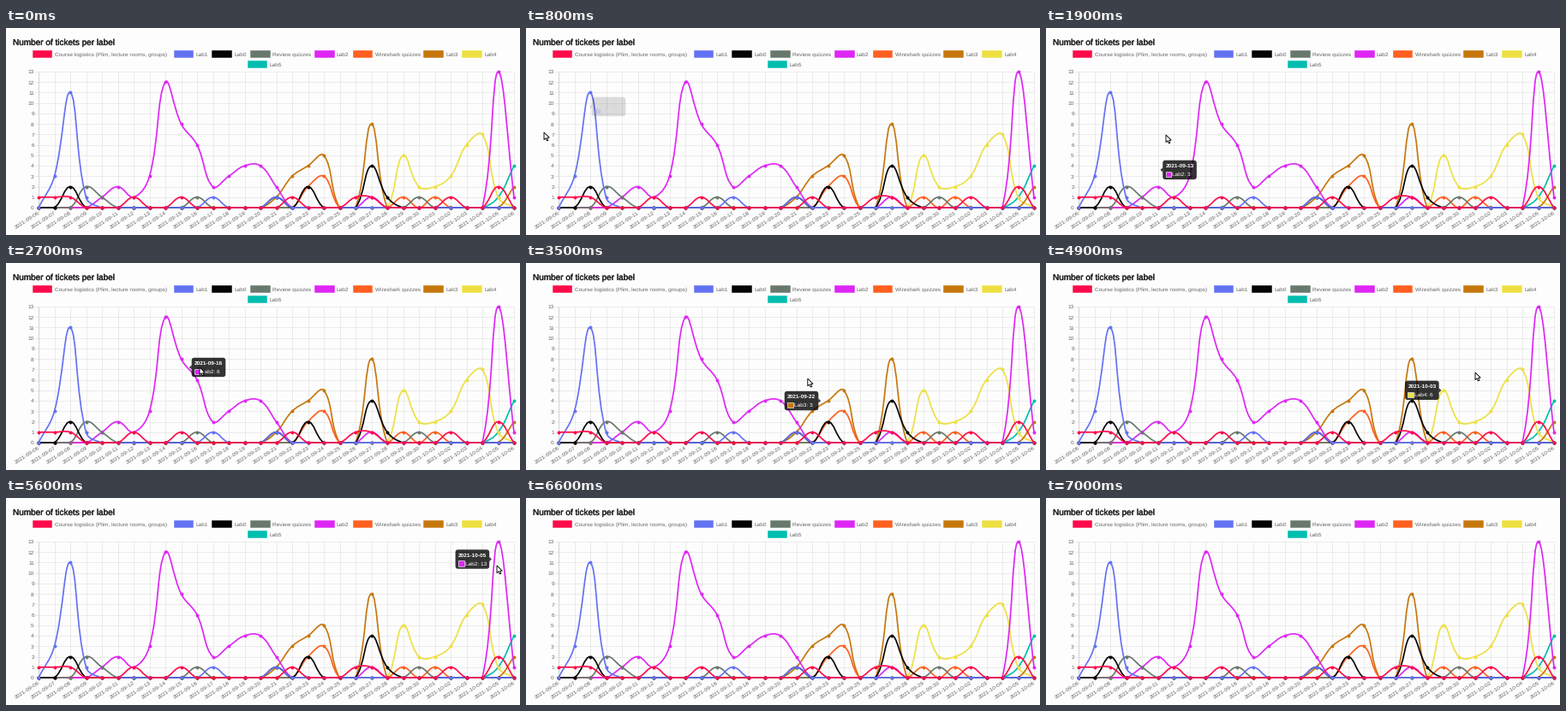
These frames come from a looping animation (600 by 242 pixels, 7200 ms). A matplotlib script:

```python
import math

import matplotlib.pyplot as plt
import numpy as np
from matplotlib.animation import FuncAnimation
from matplotlib.patches import FancyBboxPatch, PathPatch, Polygon, Rectangle
from matplotlib.path import Path
from matplotlib.patheffects import withStroke

W, H, DPI = 600, 242, 100
STEP, LOOP = 100, 7200
LEFT, RIGHT, TOP, BOTTOM = 38, 593, 51, 210
DAYS, TOP_VALUE = 31, 13
SCALE = 0.54              # page pixels to stage pixels
FONT = 12 * SCALE
TIP_W, TIP_H, TIP_GAP = 39.6, 22.4, 4.8
TIP_EASE, TIP_LEAVE = 400, 5850

plt.rcParams["font.family"] = "Liberation Sans"
plt.rcParams["text.hinting"] = "none"

# name: (colour, legend x, legend y, values by day)
SERIES = {
    "Course logistics (Plim, lecture rooms, groups)": (
        "#fd0b4a", 31.8, 30.5,
        {0: 1, 1: 1, 2: 1, 6: 1, 9: 1, 16: 1, 20: 1, 21: 1, 26: 1, 29: 2}),
    "Lab1": ("#6372f3", 196.7, 30.5, {1: 3, 2: 11, 3: 1, 11: 1, 15: 1}),
    "Lab0": ("#050505", 241.3, 30.5, {2: 2, 15: 1, 17: 2, 21: 4, 22: 1}),
    "Review quizzes": ("#68786c", 285.9, 30.5, {3: 2, 4: 1, 10: 1, 24: 1}),
    "Lab2": (
        "#de26f5", 361.0, 30.5,
        {4: 1, 5: 2, 6: 1, 7: 3, 8: 12, 9: 8, 10: 6, 11: 2, 12: 3, 13: 4,
         14: 4, 15: 2, 21: 1, 29: 13, 30: 1}),
    "Wireshark quizzes": (
        "#ff5f1f", 405.8, 30.5, {17: 2, 18: 3, 23: 1, 25: 1}),
    "Lab3": (
        "#c6770c", 488.4, 30.5,
        {15: 1, 16: 3, 17: 4, 18: 5, 21: 8, 30: 2}),
    "Lab4": (
        "#eee043", 533.4, 30.5,
        {23: 5, 24: 2, 25: 2, 26: 3, 27: 6, 28: 7, 29: 1}),
    "Lab5": ("#00beaf", 282.8, 42.4, {29: 1, 30: 4}),
}

# time, day, series under the pointer
HOVERS = [
    (782, 1, "Lab1"), (1240, 2, "Lab1"), (1740, 5, "Lab2"),
    (1872, 7, "Lab2"), (2050, 9, "Lab2"), (2652, 10, "Lab2"),
    (2950, 13, "Lab2"), (3200, 14, "Lab2"), (3500, 16, "Lab3"),
    (3650, 17, "Lab3"), (3780, 18, "Lab3"), (4000, 21, "Lab3"),
    (4370, 23, "Lab4"), (4900, 27, "Lab4"), (5300, 28, "Lab4"),
    (5490, 29, "Lab2"),
]

# time, x, y of the pointer tip
POINTER = np.array([
    (700, 8, 124), (800, 21, 122), (1240, 57, 121), (1700, 117, 124),
    (1900, 140, 125), (2300, 180, 120), (2700, 226, 122), (3200, 288, 134),
    (3700, 356, 136), (4200, 428, 131), (4900, 501, 128), (5300, 547, 116),
    (5600, 573, 79), (5900, 584, 14),
])
ARROW = np.array([(0, 0), (0, 8.6), (2, 6.8), (3.4, 9.9), (4.9, 9.2),
                  (3.6, 6.3), (6.2, 6.1)])


def pt(px):
    return px * 72 / DPI


def day_x(day):
    return LEFT + (RIGHT - LEFT) * day / (DAYS - 1)


def value_y(value):
    return BOTTOM - (BOTTOM - TOP) * value / TOP_VALUE


def day_name(day):
    date = 6 + day
    return f"2021-09-{date:02d}" if date <= 30 else f"2021-10-{date - 30:02d}"


def ease_out(u):
    return 1 - (1 - min(max(u, 0), 1)) ** 4


def text(x, y, s, size=FONT, color="#666666", **kw):
    """Text whose capitals are centred on y."""
    return ax.text(x, y + 0.36 * size, s, fontsize=pt(size), color=color,
                   va="baseline", **kw)


def spline(points, tension=0.4):
    """Smooth path through the points, handles kept inside the chart."""
    low, high = (LEFT, TOP), (RIGHT, BOTTOM)
    handles = []
    for k, cur in enumerate(points):
        prev = points[max(k - 1, 0)]
        nxt = points[min(k + 1, len(points) - 1)]
        before, after = math.dist(prev, cur), math.dist(cur, nxt)
        span = (nxt - prev) * tension / (before + after)
        handles.append((np.clip(cur - span * before, low, high),
                        np.clip(cur + span * after, low, high)))
    verts = [points[0]]
    for k in range(1, len(points)):
        verts += [handles[k - 1][1], handles[k][0], points[k]]
    return Path(verts, [Path.MOVETO] + [Path.CURVE4] * (len(verts) - 1))


def draw_grid():
    tick = 10 * SCALE
    xs = [day_x(d) for d in range(DAYS)]
    ys = [value_y(v) for v in range(TOP_VALUE + 1)]
    grid = dict(colors="#e6e6e6", linewidths=pt(0.75), zorder=1)
    ax.vlines(xs, TOP, BOTTOM + tick, **grid)
    ax.hlines(ys, LEFT - tick, RIGHT, **grid)
    ax.vlines([LEFT], TOP, BOTTOM + tick, colors="#cccccc",
              linewidths=pt(0.75), zorder=1)
    for value, y in enumerate(ys):
        text(32.8, y, str(value), ha="right")
    for day, x in enumerate(xs):
        ax.text(x + 0.5, BOTTOM + tick, day_name(day), fontsize=pt(FONT),
                color="#666666", rotation=33, rotation_mode="anchor",
                ha="right", va="center_baseline")


def draw_legend():
    for name, (color, x, y, _) in SERIES.items():
        ax.add_patch(Rectangle((x, y - 3.25), 40 * SCALE, 6.5, fc=color,
                               ec=color, lw=pt(1.5), joinstyle="miter"))
        text(x + 46 * SCALE, y, name)


def draw_series():
    for k, (color, _, _, values) in enumerate(SERIES.values()):
        points = np.array([(day_x(d), value_y(values.get(d, 0)))
                           for d in range(DAYS)])
        z = 20 - k
        ax.add_patch(PathPatch(spline(points), fill=False, ec=color,
                               lw=pt(1.7), capstyle="butt", zorder=z))
        ax.plot(*points.T, "o", color=color, ms=pt(3.9), mew=0, zorder=z)


def tip_corner(day, name):
    x, y = day_x(day), value_y(SERIES[name][3][day])
    on_left = x > (LEFT + RIGHT) / 2
    left = x - TIP_GAP - TIP_W if on_left else x + TIP_GAP
    return np.array([left, y - TIP_H / 2]), on_left


def tip_state(t):
    """Corner, side, opacity and hovered item of the tooltip at time t."""
    pos, on_left = tip_corner(2, "Lab1")
    item = None
    ends = [h[0] for h in HOVERS[1:]] + [LOOP]
    for (start, day, name), end in zip(HOVERS, ends):
        if t < start:
            break
        goal, on_left = tip_corner(day, name)
        pos = pos + (goal - pos) * ease_out((min(t, end) - start) / TIP_EASE)
        item = day, name
    alpha = ease_out((t - HOVERS[0][0]) / TIP_EASE)
    if t > TIP_LEAVE:
        alpha *= 1 - ease_out((t - TIP_LEAVE) / 150)
    return pos, on_left, alpha, item


fig = plt.figure(figsize=(W / DPI, H / DPI), dpi=DPI, facecolor="#fdfdfd")
ax = fig.add_axes([0, 0, 1, 1])
ax.set_xlim(0, W)
ax.set_ylim(H, 0)
ax.axis("off")

text(8, 16.4, "Number of tickets per label", 10, "#222222",
     path_effects=[withStroke(linewidth=0.25, foreground="#222222")])
draw_grid()
draw_legend()
draw_series()

tip_box = FancyBboxPatch((0, 0), TIP_W, TIP_H, fc="black", lw=0, zorder=30,
                         boxstyle="round,pad=0,rounding_size=3.2")
tip_caret = Polygon([(0, 0)] * 3, fc="black", lw=0, zorder=30)
tip_swatch = Rectangle((0, 0), 6.5, 6.5, ec="white", lw=pt(0.6), zorder=31)
for patch in (tip_box, tip_caret, tip_swatch):
    ax.add_patch(patch)
tip_title = text(0, 0, "", color="white", weight="bold", zorder=32)
tip_body = text(0, 0, "", color="white", zorder=32)
tip_parts = [tip_box, tip_caret, tip_swatch, tip_title, tip_body]
pointer = ax.add_patch(Polygon(ARROW, fc="white", ec="black", lw=pt(0.9),
                               joinstyle="miter", zorder=40))


def update(frame):
    t = frame * STEP
    (x, y), on_left, alpha, item = tip_state(t)
    shown = item is not None and alpha > 0.01
    for part in tip_parts:
        part.set_visible(shown)
    if shown:
        day, name = item
        color, _, _, values = SERIES[name]
        tip_box.set_bounds(x, y, TIP_W, TIP_H)
        edge, tip = (x + TIP_W, 2.7) if on_left else (x, -2.7)
        mid = y + TIP_H / 2
        tip_caret.set_xy([(edge, mid - 2.7), (edge + tip, mid),
                          (edge, mid + 2.7)])
        tip_swatch.set_xy((x + 3.4, y + 12.9))
        tip_swatch.set_facecolor(color)
        tip_title.set_position((x + 3.2, y + 6.2 + 0.36 * FONT))
        tip_title.set_text(day_name(day))
        tip_body.set_position((x + 11, y + 16.1 + 0.36 * FONT))
        tip_body.set_text(f"{name}: {values[day]}")
        for part in tip_parts:
            part.set_alpha(alpha)
        tip_box.set_alpha(0.8 * alpha)
        tip_caret.set_alpha(0.8 * alpha)

    times, xs, ys = POINTER.T
    pointer.set_visible(bool(times[0] <= t <= times[-1]))
    pointer.set_xy(ARROW + (np.interp(t, times, xs), np.interp(t, times, ys)))
    return tip_parts + [pointer]


anim = FuncAnimation(fig, update, frames=LOOP // STEP, interval=STEP,
                     repeat=True, repeat_delay=0, blit=False)
plt.show()
```
